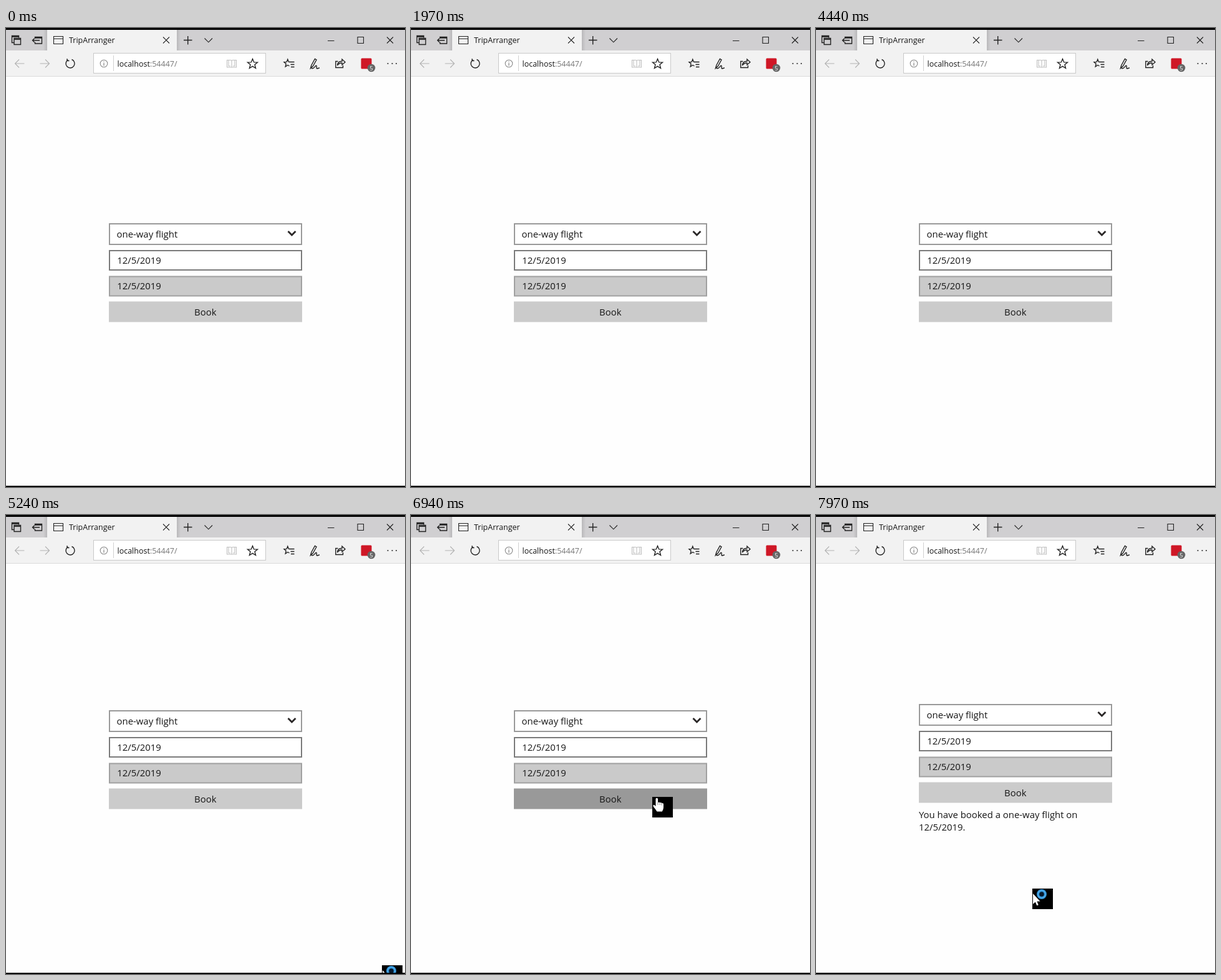
An HTML page that plays this animation: 640x736 px, repeating every 8 s.

```html
<!DOCTYPE html>
<html lang="en">
<head>
<meta charset="utf-8">
<title>Flight form</title>
<style>
html, body { margin: 0; width: 100%; height: 100%; overflow: hidden; background: #fefefe; }
svg { display: block; width: 640px; height: 736px; }
text { font-family: "Open Sans", "Noto Sans", sans-serif; fill: #161616; }
.form text { font-size: 14.9px; }
.icon { fill: none; stroke: #222; stroke-width: 1.1; }
.pale { stroke: #b3b3b3; }
.bold { stroke-width: 1.4; }
</style>
</head>
<body>
<svg viewBox="0 0 640 736">
  <defs>
    <linearGradient id="shadeL"><stop offset="0" stop-color="#d0cfd1"/><stop offset="1" stop-color="#b9b8ba"/></linearGradient>
    <linearGradient id="shadeR"><stop offset="0" stop-color="#b9b8ba"/><stop offset="1" stop-color="#d0cfd1"/></linearGradient>
    <path id="star" d="M0,-8 L2.2,-2.6 8,-2.4 3.5,1.3 5,7 0,3.8 -5,7 -3.5,1.3 -8,-2.4 -2.2,-2.6Z"/>
  </defs>
  <rect width="640" height="736" fill="#fefefe"/>

  <!-- title bar -->
  <rect width="640" height="36" fill="#d0cfd1"/>
  <rect x="60" y="3" width="6" height="33" fill="url(#shadeL)"/>
  <rect x="274" y="3" width="6" height="33" fill="url(#shadeR)"/>
  <rect y="36" width="640" height="42" fill="#f2f2f2"/>
  <rect x="66" y="3" width="208" height="34" fill="#f2f2f2"/>
  <rect y="77" width="640" height="1" fill="#dadada"/>
  <text x="101" y="24" font-size="12.5">TripArranger</text>
  <g class="icon">
    <path class="bold" d="M12.5,23.5H9.5V12.5H20.5V15.5M9.5,14H20.5M13,16.5H23.5V26.5H13ZM13,18.3H23.5"/>
    <path class="bold" d="M46.5,17V14.5H57.5V25H46.5V22.5M46.5,16H57.5M54,19.8H42.5M45.5,16.8L42.5,19.8 45.5,22.8"/>
    <path d="M76.5,13.5H91.5V25.5H76.5ZM76.5,17.2H91.5"/>
    <path d="M252,14.5L262,24.5M262,14.5L252,24.5"/>
    <path class="bold" d="M285,19.5H298.5M291.7,13V26.5"/>
    <path d="M318.5,16.5L324.8,22.8 331,16.5"/>
    <path d="M516,20.5H526.5M564,14.5H573.5V24.5H564ZM611,14.5L621,24.5M621,14.5L611,24.5"/>
  </g>

  <!-- toolbar -->
  <rect x="140.5" y="40.5" width="276" height="32" fill="#fff" stroke="#c9c9c9"/>
  <path d="M172.5,44V69" stroke="#d0d0d0"/>
  <text x="178.5" y="62" font-size="12.5">localhost<tspan fill="#777">:54447/</tspan></text>
  <g class="icon">
    <path class="pale" d="M29.5,57H14.5M21,50.5L14.5,57 21,63.5M54.5,57H69.5M63,50.5L69.5,57 63,63.5"/>
    <path class="bold" d="M99.5,51A7,7 0 1 0 105.5,50.5M98,49.3V52.5H101.5"/>
    <circle cx="157" cy="57" r="5.8" stroke="#888"/>
    <path stroke="#777" d="M157,56V60.5M157,53.5V54.8"/>
    <path stroke="#c0c0c0" d="M362,52.5V63.5M354.5,51.5H360Q362,51.5 362,53Q362,51.5 364,51.5H369.5V63H354.5ZM357,51.5V61H360M367,51.5V61H364"/>
    <use href="#star" x="395.5" y="57.5" class="bold"/>
    <path class="bold" d="M455,54.5H462.5M456.5,58.5H462.5M457,62.5H462.5M455,54.5L453.5,54.4 451.8,50.2 450.2,54.4 446,54.6 449.2,57.5 448.2,62 452,59.5 454.5,61"/>
    <path class="bold" d="M488.5,64.5L490,59.5 495.5,49.5 498,51 492.5,61ZM490,64.5C495,66.5 496,59 498,60.5C499,61.5 497,65 499,65C500.5,65 501.5,64 503,64"/>
    <path class="bold" d="M532.5,53.5H528.8V63.5H540.5V60M531.5,60C532,55.5 535,53.3 539,53.3V50L544,54.7 539,59V56C536,56 533.5,57 531.5,60Z"/>
  </g>
  <rect x="569.5" y="48.5" width="17" height="17" rx="1.5" fill="#cf1726"/>
  <circle cx="586" cy="64" r="6.3" fill="#666"/>
  <text x="586" y="67.6" font-size="9.5" text-anchor="middle" style="fill:#fff">5</text>
  <g fill="#333"><circle cx="612.5" cy="57" r="1.1"/><circle cx="619.5" cy="57" r="1.1"/><circle cx="626" cy="57" r="1.1"/></g>

  <!-- form -->
  <g id="form" class="form">
    <g stroke-width="2">
      <rect x="166" y="314" width="308" height="33" fill="#fff" stroke="#999"/>
      <rect x="166" y="357" width="308" height="31" fill="#fff" stroke="#7a7a7a"/>
      <rect x="166" y="398.5" width="308" height="31" fill="#cacaca" stroke="#a0a0a0"/>
    </g>
    <rect id="book" x="165" y="438.5" width="310" height="33" fill="#cbcbcb"/>
    <path d="M452.5,326L458.5,332 464.5,326" fill="none" stroke="#2b2828" stroke-width="2.8"/>
    <text x="177.5" y="335.5">one-way flight</text>
    <text x="178.3" y="378">12/5/2019</text>
    <text x="178.3" y="419">12/5/2019</text>
    <text x="319.8" y="461" text-anchor="middle">Book</text>
  </g>
  <g id="message" class="form">
    <text x="165" y="486">You have booked a one-way flight on</text>
    <text x="165" y="506">12/5/2019.</text>
  </g>

  <!-- pointers, with the hotspot at 0,0 -->
  <g id="arrow">
    <rect y="-8" width="33" height="33"/>
    <path d="M1,0V17L4.8,13.6 7.3,19.3 9.8,18.2 7.4,12.6H12.5Z" fill="#fff"/>
    <circle cx="15" cy="1" r="5.9" fill="#07192c" stroke="#2e8fd4" stroke-width="4.2"/>
    <circle cx="15" cy="1" r="6" fill="none" stroke="#58b4ee" stroke-width="1.2"/>
  </g>
  <g id="hand">
    <rect x="-7" y="-1" width="33" height="33"/>
    <path d="M-1.5,2Q0.2,-0.5 2,2V8Q4,6.8 5.2,8.3Q7,7.2 8.2,9Q10.8,8.3 11,11V16Q11,19 8.8,22.5H0.5Q-2,18.5 -5.3,14.5Q-6.3,12 -4,11.8L-1.5,14Z" fill="#fff"/>
    <path d="M2,8V12M5.2,8.5V12M8.2,9V12.5" stroke="#555" stroke-width=".7"/>
  </g>

  <rect width="640" height="3"/>
  <rect y="734" width="640" height="2"/>
</svg>
<script>
const LOOP = 8000, FRAME = 100 / 3;
const PRESS = 208, BOOKED = 211;
const el = id => document.getElementById(id);
const [form, book, message, arrow, hand] = ["form", "book", "message", "arrow", "hand"].map(el);

const linear = p => p;
const glide = p => 1.5 * p - 0.5 * p * p;
const easeOut = p => p * (2 - p);
const smooth = p => p * p * (3 - 2 * p);

// pointer moves in ticks: start, end, from, to, easing
const moves = [
  [145, 147, [607, 654], [543, 697], linear],
  [157, 167, [603, 730], [396, 514], glide],
  [167, 173, [396, 514], [394, 453], easeOut],
  [222, 228, [394, 453], [347, 607], smooth]
];

function pointer(n) {
  if (n < 145 || (n > 147 && n < 157)) return null;
  const [start, end, from, to, ease] = moves.filter(m => m[0] <= n).pop();
  const k = ease(Math.min(1, (n - start) / (end - start)));
  return from.map((v, i) => Math.round(v + (to[i] - v) * k));
}

const show = (node, on) => node.setAttribute("visibility", on ? "visible" : "hidden");

function draw(t) {
  const n = Math.floor(t / FRAME);
  const booked = n >= BOOKED;
  const lift = booked ? -10 : 0;
  form.setAttribute("transform", `translate(0 ${lift})`);
  book.setAttribute("fill", n >= PRESS && !booked ? "#999" : "#cbcbcb");
  show(message, booked);

  const at = pointer(n);
  const over = at && at[0] < 475 && at[1] > 438 + lift && at[1] < 471 + lift;
  show(arrow, at && !over);
  show(hand, over);
  if (at) for (const p of [arrow, hand]) p.setAttribute("transform", `translate(${at})`);
}

const begin = performance.now();
function tick() {
  draw((performance.now() - begin) % LOOP);
  requestAnimationFrame(tick);
}
draw(0);
requestAnimationFrame(tick);
</script>
</body>
</html>
```
